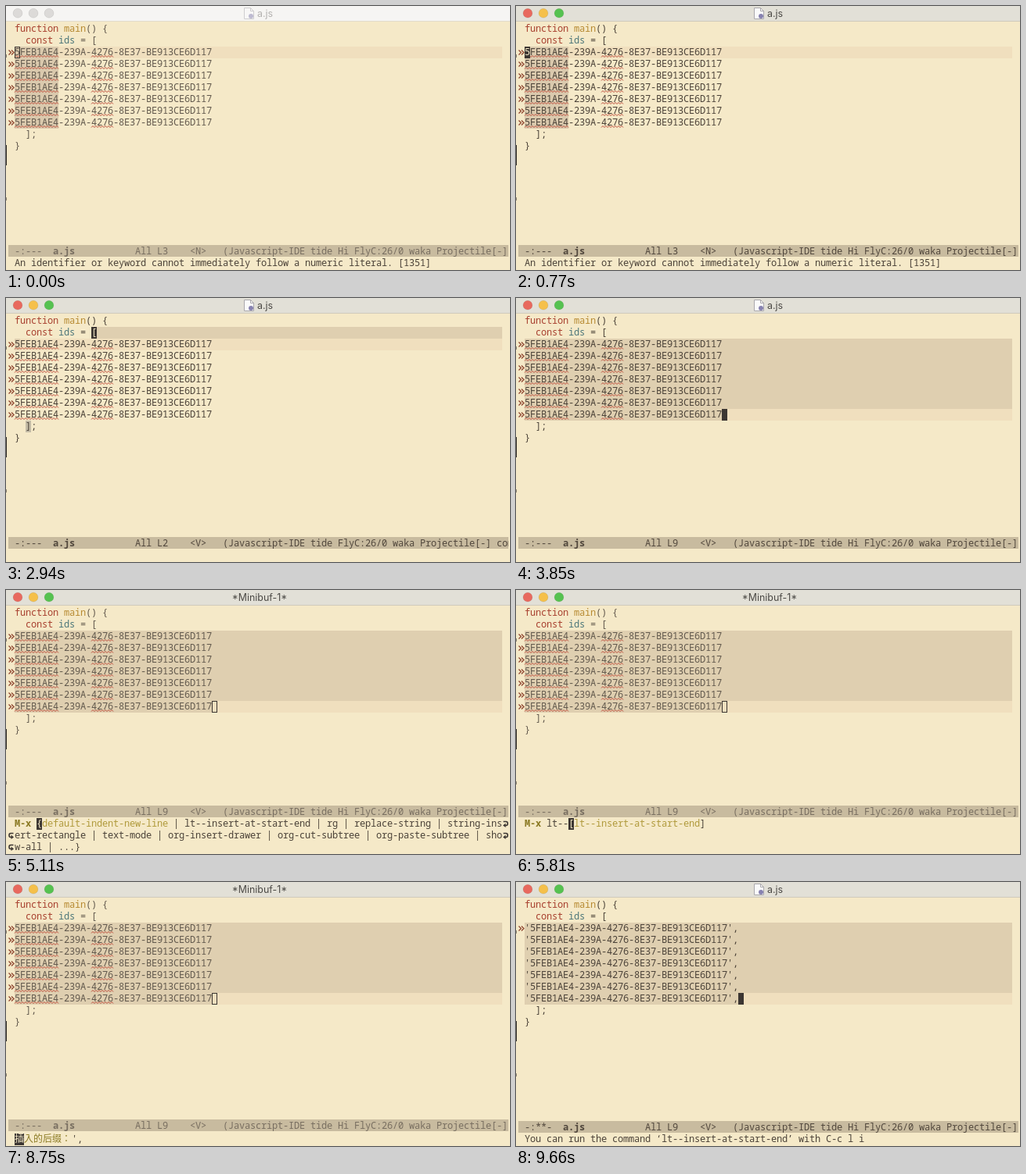
Animation, 644 px wide and 338 px high, one loop 9.73 s. Source, as an HTML page:

```html
<!DOCTYPE html>
<html lang="en">
<head>
<meta charset="utf-8">
<title>a.js</title>
<style>
  html, body { margin: 0; width: 100%; height: 100%; overflow: hidden; background: #f5e9c8; }
  svg { display: block; width: 644px; height: 338px; }
  text { white-space: pre; font: 12px "Noto Sans Mono", "DejaVu Sans Mono", monospace; letter-spacing: -.2px; }
  .title { font: 12.4px Inter, "Open Sans", sans-serif; letter-spacing: 0; }
  .cjk { font: 500 12px "Noto Sans CJK TC", "Noto Sans CJK JP", "Noto Sans CJK", sans-serif; letter-spacing: 0; }
  .bold { font-weight: 700; }
</style>
</head>
<body>
<svg id="stage" viewBox="0 0 644 338"></svg>
<script>
const LOOP = 9730;
const LEFT = 11, CHAR = 7, LINE = 15, TOP = 22, RIGHT = 634;
const ID = '5FEB1AE4-239A-4276-8E37-BE913CE6D117';
const C = {
  bg: '#f5e9c8', ink: '#4b4238', dim: '#62594d', line: '#f0dfbe', region: '#dfcfb0',
  symbol: '#dac9ad', match: '#c3bba6', bar: '#c8bb9f', cursor: '#3c3632',
  red: '#a8402f', gold: '#b78a32', teal: '#4c767a', olive: '#8b7a24', pick: '#b09a3c'
};

// Each step changes only the properties that it names.
const steps = [
  [0, { focus: false, dim: true, row: 3, col: 0, hollow: true, mode: 'N', hi: true, symbols: true,
        errors: true, done: false, title: 'a.js', region: '', match: false,
        echo: 'An identifier or keyword cannot immediately follow a numeric literal. [1351]' }],
  [490, { focus: true, dim: false, hollow: false }],
  [1050, { mode: 'V', echo: '' }],
  [1610, { row: 2, region: 'up' }],
  [2100, { col: 14, match: true }],
  [2660, { hi: false, symbols: false }],
  [3780, { row: 9, col: 36, region: 'inner', match: false, hi: true }],
  [4760, { title: '*Minibuf-1*', dim: true, hollow: true, ask: { kind: 'list', typed: '' } }],
  [5390, { ask: { kind: 'match', typed: 'l' } }],
  [5530, { ask: { kind: 'match', typed: 'lt' } }],
  [5670, { ask: { kind: 'match', typed: 'lt-' } }],
  [5810, { ask: { kind: 'match', typed: 'lt--' } }],
  [6300, { ask: { kind: 'prompt', label: '入的前缀：', typed: '' } }],
  [6930, { ask: { kind: 'prompt', label: '入的前缀：', typed: "'" } }],
  [8050, { ask: { kind: 'prompt', label: '入的后缀：', typed: '' } }],
  [8400, { ask: { kind: 'prompt', label: '入的后缀：', typed: "'" } }],
  [8610, { ask: { kind: 'prompt', label: '入的后缀：', typed: "'," } }],
  [9030, { ask: null, title: 'a.js', dim: false, hollow: false, done: true, errors: false, col: 39,
           echo: 'You can run the command ‘lt--insert-at-start-end’ with C-c l i' }]
];

const colX = col => LEFT + col * CHAR;
const rowY = row => TOP + (row - 1) * LINE;
const esc = s => s.replace(/&/g, '&amp;').replace(/</g, '&lt;');
const rect = (x, y, w, h, fill, more = '') =>
  `<rect x="${x}" y="${y}" width="${w}" height="${h}" fill="${fill}" ${more}/>`;
const text = (x, y, s, fill, cls = '') =>
  `<text x="${x}" y="${y}" fill="${fill}" class="${cls}">${esc(s)}</text>`;
const stroke = (d, color, width = 1) =>
  `<path d="${d}" fill="none" stroke="${color}" stroke-width="${width}"/>`;
const band = (row, from, to, fill) => rect(from, rowY(row), to - from, LINE, fill);

// Lays pieces [string, colour, class] side by side on the character grid.
function run(y, pieces, col = 0) {
  return pieces.map(([s, fill, cls]) => {
    const out = text(colX(col), y + 11, s, fill, cls);
    col += s.length;
    return out;
  }).join('');
}

function block(x, y, glyph, width = CHAR, cls = '') {
  return rect(x, y, width, LINE, C.cursor) + text(x, y + 11, glyph, C.bg, cls);
}

function squiggle(from, to, y) {
  let d = `M${colX(from)} ${y + 13.5}`;
  for (let x = colX(from); x < colX(to); x += 4) d += 'l2 -2l2 2';
  return stroke(d, '#bc4a38');
}

function titleBar(s) {
  const lights = s.focus ? ['#e8695e', '#f5c04a', '#56c250'] : ['#dcdad8', '#dcdad8', '#dcdad8'];
  const ink = s.focus ? '#4c4a46' : '#b4b2b0';
  let out = rect(0, 0, 644, 20, s.focus ? '#e2e0d7' : '#f6f5f3') +
    rect(0, 19, 644, 1, s.focus ? '#cfcabc' : '#e2dccb');
  lights.forEach((fill, i) => {
    out += `<circle cx="${15 + 20 * i}" cy="9.200" r="5.900" fill="${fill}" stroke="#0002" stroke-width=".6"/>`;
  });
  if (s.title !== 'a.js') {
    return out + `<text x="324" y="14" text-anchor="middle" fill="${ink}" class="title">${s.title}</text>`;
  }
  const icon = '<path d="M304.500 2.500h8l4 4v10h-12z" fill="#fafafa" stroke="#aaa8ac"/>' +
    '<path d="M312.500 2.500v4h4" fill="none" stroke="#aaa8ac"/><circle cx="313" cy="13" r="3" fill="#8782b0"/>';
  return out + `<g opacity="${s.focus ? 1 : .5}">${icon}</g>` + text(321, 14, s.title, ink, 'title');
}

function bands(s) {
  const cursorX = colX(s.col);
  let out = band(s.region === 'inner' ? 9 : 3, LEFT, RIGHT, C.line);
  if (s.region === 'up') {
    out += band(2, cursorX, RIGHT, C.region) + band(3, LEFT, LEFT + CHAR, C.region);
  }
  if (s.region === 'inner') {
    out += rect(LEFT, rowY(3), RIGHT - LEFT, 6 * LINE, C.region) + band(9, LEFT, cursorX, C.region);
  }
  if (s.symbols) {
    for (let row = 3; row <= 9; row++) out += band(row, LEFT, colX(8), C.symbol);
  }
  if (s.match) out += band(10, colX(2), colX(3), C.match);
  return out;
}

function code(s) {
  const ink = s.dim ? C.dim : C.ink;
  let out = run(rowY(1), [['function', C.red], [' ', ink], ['main', C.gold], ['() {', ink]]) +
    run(rowY(2), [['  ', ink], ['const', C.red], [' ', ink], ['ids', C.teal], [' = [', ink]]);
  for (let row = 3; row <= 9; row++) {
    const y = rowY(row);
    out += run(y, [[s.done ? `'${ID}',` : ID, ink]]);
    if (s.errors) out += squiggle(0, 8, y) + squiggle(14, 18, y);
    if (s.errors || row === 3) {
      out += stroke(`M3.500 ${y + 4.5}l3 3l-3 3M7 ${y + 4.5}l3 3l-3 3`, '#8f4630', 1.3);
    }
  }
  out += run(rowY(10), [['  ];', ink]]) + run(rowY(11), [['}', ink]]);
  const x = colX(s.col), y = rowY(s.row);
  if (s.hollow) return out + rect(x + .5, y + .5, CHAR - 1, LINE - 1, 'none', `stroke="${C.cursor}"`);
  const under = s.row === 2 ? (s.col === 14 ? '[' : ' ') : (s.col === 0 ? '5' : ' ');
  return out + block(x, y, under);
}

function modeLine(s, y) {
  const ink = s.dim ? '#786e60' : '#51473c';
  const minor = `(Javascript-IDE tide ${s.hi ? 'Hi ' : ''}FlyC:26/0 waka Projectile[-] company`;
  return rect(3, y, 639, LINE, C.bar) + '<g clip-path="url(#bar)">' + run(y + 1, [
    [s.done ? '-:**-  ' : '-:---  ', ink], ['a.js', ink, 'bold'],
    [`           All L${s.row}    <${s.mode}>   ${minor}`, ink]
  ]) + '</g>';
}

function wrapMark(x, y, flip) {
  const turn = flip ? `translate(${x + 7} ${y}) scale(-1 1)` : `translate(${x} ${y})`;
  return `<g transform="${turn}">` + stroke('M6.500 4.500H3Q1 4.500 1 7T3 9.500H5', C.cursor, 1.6) +
    `<path d="M3.500 6.500L7 9.500L3.500 12z" fill="${C.cursor}"/></g>`;
}

function miniBuffer(s, y) {
  const ask = s.ask;
  if (!ask) return run(y, [[s.echo, C.ink]]);
  if (ask.kind === 'prompt') {
    return block(LEFT, y, '插', 12, 'cjk') + text(LEFT + 12, y + 11, ask.label, C.olive, 'cjk') +
      text(LEFT + 73, y + 11, ask.typed, C.ink);
  }
  const lead = [['M-x', C.olive, 'bold'], [' ' + ask.typed, C.ink]];
  const at = 4 + ask.typed.length;
  const cursor = glyph => block(colX(at), y, glyph);
  if (ask.kind === 'match') {
    return run(y, [...lead, [' ', C.ink], ['lt--insert-at-start-end', C.pick], [']', C.ink]]) + cursor('[');
  }
  const rows = [
    'ert-rectangle | text-mode | org-insert-drawer | org-cut-subtree | org-paste-subtree | sho',
    'w-all | ...}'
  ];
  return run(y, [...lead, [' ', C.ink], ['default-indent-new-line', C.pick],
      [' | lt--insert-at-start-end | rg | replace-string | string-ins', C.ink]]) + cursor('{') +
    rows.map((line, i) => run(y + LINE * (i + 1), [[line, C.ink]]) +
      wrapMark(3, y + LINE * (i + 1), false) + wrapMark(635, y + LINE * i, true)).join('');
}

function draw(s) {
  const kind = s.ask ? s.ask.kind : 'echo';
  // The Chinese prompt needs a slightly taller row; completion takes three rows.
  const barY = { echo: 306, prompt: 304, list: 276, match: 276 }[kind];
  const miniY = kind === 'prompt' ? 322 : barY + LINE + 1;
  return '<clipPath id="bar"><rect x="3" y="270" width="639" height="60"/></clipPath>' +
    rect(0, 0, 644, 338, C.bg) + titleBar(s) +
    rect(0, 178, 1, 26, '#2c2824') + rect(0, 62, 1, 4, '#8a8070') + rect(0, 245, 1, 4, '#8a8070') +
    bands(s) + code(s) + modeLine(s, barY) + miniBuffer(s, miniY);
}

const states = [];
steps.reduce((state, [at, change]) => {
  const next = { ...state, ...change };
  states.push({ at, markup: draw(next) });
  return next;
}, {});

const stage = document.getElementById('stage');
const start = performance.now();
let shown = null;
function tick() {
  const t = (performance.now() - start) % LOOP;
  const state = states.filter(s => s.at <= t).pop();
  if (state !== shown) {
    shown = state;
    stage.innerHTML = state.markup;
  }
  requestAnimationFrame(tick);
}
tick();
</script>
</body>
</html>
```
